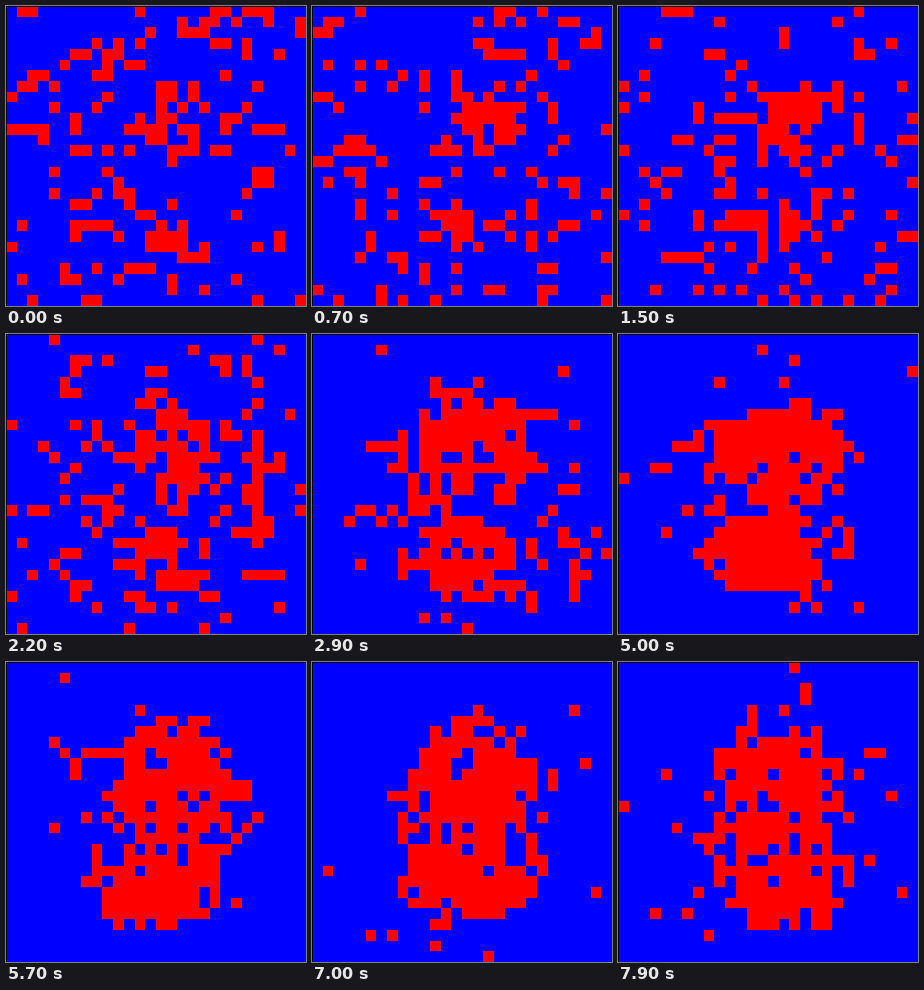
Write a matplotlib script that moves like this. It is 300 px wide and 300 px high and loops after 8000 ms.

```python
import random

import numpy as np
import matplotlib.pyplot as plt
from matplotlib.animation import FuncAnimation
from matplotlib.colors import ListedColormap

SIZE = 300
N = 28          # cells per side
FRAMES = 80
STEP_MS = 100
HOPS = 6        # hop attempts per walker and frame
STICK = 0.35    # pull of each occupied side neighbour
PULL = 5        # weight of the two lobes against the halo

ROW, COL = np.mgrid[:N, :N]
SIDES = [(-1, 0), (1, 0), (0, -1), (0, 1)]
NEAR = SIDES + [(-1, -1), (-1, 1), (1, -1), (1, 1)]


def gather(t):
    """Ease from scattered (0) to gathered (1)."""
    u = np.clip((t - 13) / 13, 0, 1)
    return u * u * (3 - 2 * u)


def lobe(x, y, rx, ry):
    d = ((COL - x) / rx) ** 2 + ((ROW - y) / ry) ** 2
    return np.exp(-d ** 2)


def attraction(t):
    g = gather(t)
    spread = 18 * (4.4 / 18) ** g
    halo = np.exp(-((COL - 14) / spread) ** 2 / 2
                  - ((ROW - 14.5) / (1.15 * spread)) ** 2 / 2)
    sway = 0.8 * np.sin(2 * np.pi * t / 45)
    k = 0.6 + 0.4 * g
    upper = lobe(14.5 + sway, 10.5, 4.8 * k, 4.5 * k)
    lower = lobe(14 - sway, 20.5, 4.5 * k, 3.2 * k)
    return halo + 1e-5 + PULL * (upper + lower)


def shift(cell, step):
    return (cell[0] + step[0]) % N, (cell[1] + step[1]) % N


def contacts(cell, taken):
    return sum(shift(cell, s) in taken for s in SIDES)


def hop(rng, walkers, taken, w):
    for i, cell in enumerate(walkers):
        new = shift(cell, rng.choice(NEAR))
        if new in taken:
            continue
        taken.remove(cell)
        gain = contacts(new, taken) - contacts(cell, taken)
        if rng.random() < w[new] / w[cell] * np.exp(STICK * gain):
            walkers[i] = new
        taken.add(walkers[i])


def grow(rng, walkers, taken, count):
    while len(walkers) < count:
        new = shift(rng.choice(walkers), rng.choice(NEAR))
        if new not in taken:
            walkers.append(new)
            taken.add(new)


def simulate():
    rng = random.Random(7)
    walkers = rng.sample([(r, c) for r in range(N) for c in range(N)], 156)
    taken = set(walkers)
    w = attraction(0)
    for _ in range(60):
        hop(rng, walkers, taken, w)

    grids = []
    for t in range(FRAMES):
        if t:
            w = attraction(t)
            grow(rng, walkers, taken, 156 + 34 * gather(t))
            for _ in range(HOPS):
                hop(rng, walkers, taken, w)
        grid = np.zeros((N, N))
        for cell in walkers:
            grid[cell] = 1
        grids.append(grid)
    return grids


grids = simulate()

fig = plt.figure(figsize=(SIZE / 100, SIZE / 100), dpi=100)
ax = fig.add_axes([0, 0, 1, 1])
ax.axis("off")
image = ax.imshow(grids[0], cmap=ListedColormap(["#0000ff", "#ff0000"]),
                  vmin=0, vmax=1, interpolation="nearest", aspect="auto",
                  extent=(0, SIZE, SIZE, 0))
# thin black rule along the left and top
ax.axvspan(0, 1, color="black", lw=0)
ax.axhspan(0, 1, color="black", lw=0)
ax.set(xlim=(0, SIZE), ylim=(SIZE, 0))


def update(i):
    image.set_data(grids[i])
    return [image]


anim = FuncAnimation(fig, update, frames=FRAMES, interval=STEP_MS,
                     repeat=True, repeat_delay=0, blit=False)
plt.show()
```
